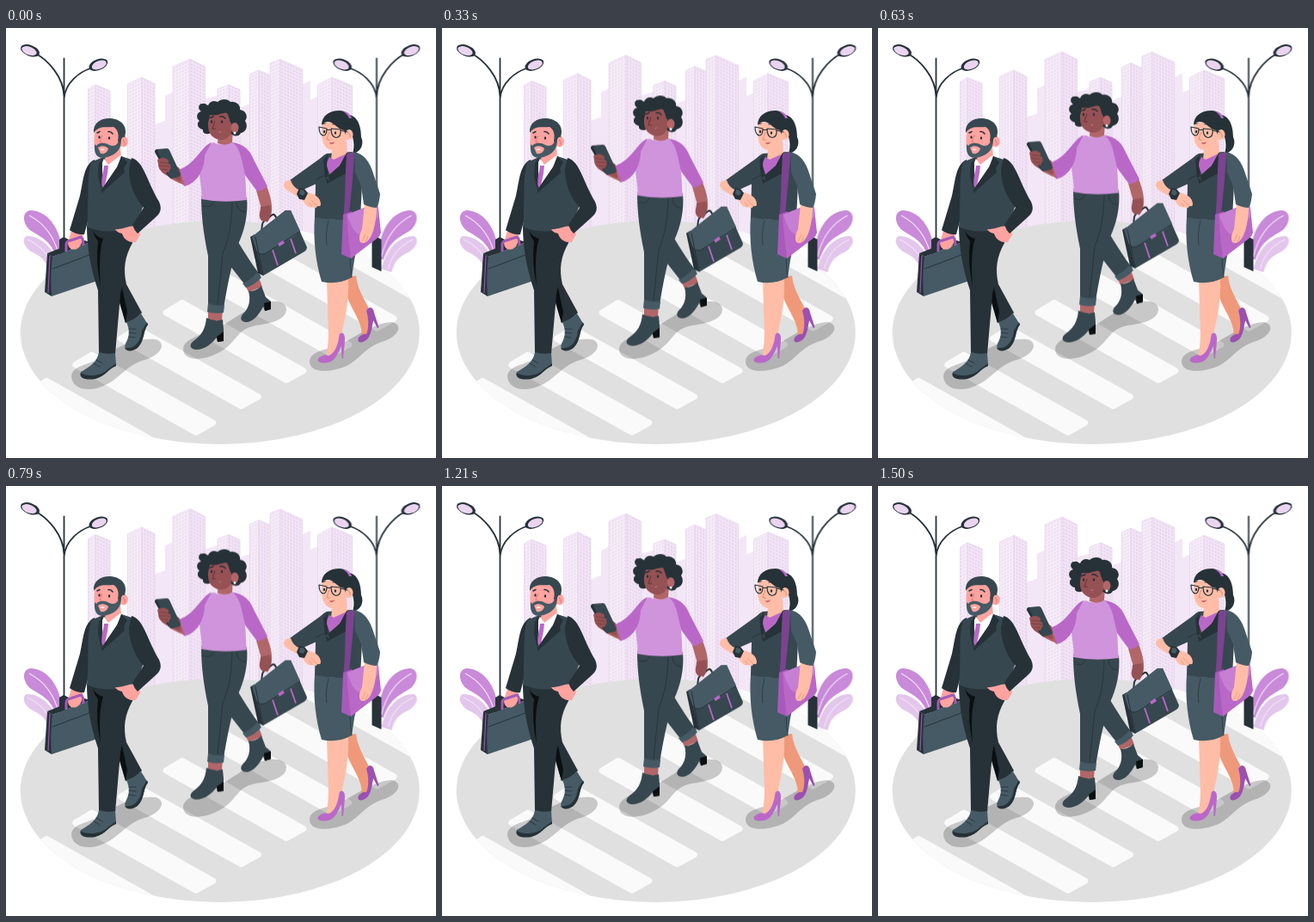
An HTML page for the animation above (1.54 s loop, 500 by 500 pixels).

```html
<!DOCTYPE html>
<html lang="en">
<head>
<meta charset="utf-8">
<title>Pedestrians</title>
<style>
html, body { margin: 0; width: 100%; height: 100%; overflow: hidden; background: #fff; }
svg { display: block; width: 100vw; height: 100vh; }
.float { animation: float 1540ms linear infinite; }
@keyframes float {
  0%, 97.4%, 100% { transform: translateY(0); }
  48.7% { transform: translateY(-10px); }
}
.ink { fill: #263238; }
.slate { fill: #37474f; }
.steel { fill: #455a64; }
.black { fill: #0b0f11; }
.violet { fill: #ba68c8; }
.lilac { fill: #cf94dc; }
.plum { fill: #9c50b0; }
.pink { fill: #ffa3a0; }
.peach { fill: #ffbda7; }
.tan { fill: #f0997a; }
.brown { fill: #955154; }
.rust { fill: #b16668; }
.line { fill: none; stroke: #263238; stroke-linecap: round; stroke-linejoin: round; }
.stripe { fill: #fafafa; stroke: #fafafa; stroke-width: 7; stroke-linejoin: round; }
.shade { fill: #000; opacity: .2; }
</style>
</head>
<body>
<svg viewBox="0 0 500 500" preserveAspectRatio="none">
<defs>
  <clipPath id="disc"><ellipse cx="248.8" cy="354" rx="232" ry="130"/></clipPath>
  <pattern id="winL" width="3.4" height="4" patternUnits="userSpaceOnUse" patternTransform="skewY(-25)">
    <rect x=".6" y=".8" width="2" height="2" fill="#ecdaf0"/>
  </pattern>
  <pattern id="winR" width="3.4" height="4" patternUnits="userSpaceOnUse" patternTransform="skewY(25)">
    <rect x=".6" y=".8" width="2" height="2" fill="#e6d0ec"/>
  </pattern>
  <g id="side">
    <path fill="#c98ad9" d="M65 266C66 238 51 213 29 212C18 213 19 227 28 235C39 243 52 245 60 270Z"/>
    <path fill="#e3c6ec" d="M62 280C57 256 40 241 24 242C17 246 22 256 31 261C41 266 47 270 50 284Z"/>
    <path fill="none" stroke="#f2e2f6" stroke-width="1.2" d="M27 218Q54 232 62 266M25 246Q48 256 54 280"/>
    <path class="ink" d="M62 246L67 243L73 246V278L62 283Z"/>
    <path class="line" stroke-width="1.800" d="M67.500 35.500V250M67.500 80C67 56 48 37 35 30M67.500 82C69 63 86 51 98 47"/>
    <g transform="translate(28 26.300) rotate(21)">
      <ellipse class="ink" rx="11.500" ry="6.300"/>
      <ellipse cx="-.8" cy=".6" rx="9" ry="4.700" fill="#ead4f0"/>
    </g>
    <g transform="translate(107.300 42.700) rotate(-21)">
      <ellipse class="ink" rx="11.500" ry="6.300"/>
      <ellipse cx=".8" cy=".6" rx="9" ry="4.700" fill="#ead4f0"/>
    </g>
  </g>
</defs>

<g id="city" class="float"></g>
<ellipse cx="248.8" cy="354" rx="232" ry="130" fill="#e0e0e0"/>
<g id="road" clip-path="url(#disc)"></g>
<use href="#side"/>
<use href="#side" transform="matrix(-1 0 0 1 498.500 0)"/>

<g>
  <path class="shade" d="M76 405C77 391 100 392 117 380C135 366 158 360 174 362C187 366 181 379 164 385C141 391 136 404 118 414C100 424 77 422 76 405Z"/>
  <path class="shade" d="M206 373C207 360 232 356 250 347C262 340 275 330 292 322C305 316 325 315 326 327C326 340 305 344 290 346C268 350 268 366 250 376C230 388 206 388 206 373Z"/>
  <path class="shade" d="M353 387C355 374 375 375 392 366C410 357 430 342 449 342C462 345 457 358 440 364C418 370 412 385 396 393C375 402 352 401 353 387Z"/>
</g>

<g id="man">
  <path class="ink" d="M48 262L54 266L53 312L45 307Z"/>
  <path class="ink" d="M48 262L88 246L98 249L54 266Z"/>
  <path class="steel" d="M54 266L98 249L106 294L53 312Q51 290 54 266Z"/>
  <path class="line" stroke-width="1" d="M54 280L102 262"/>
  <path fill="none" stroke="#9c50b0" stroke-width="1.200" d="M51 265L49 308"/>
  <path class="pink" d="M76 236L89 238C90 246 88 254 82 257C75 259 72 255 72 249Z"/>
  <path fill="none" stroke="#a45ab8" stroke-width="3" stroke-linejoin="round" d="M70 260V252Q70 248 75 247L87 243Q90 244 90 253"/>
  <path class="ink" d="M103 153C90 159 90 178 86 195L74 235Q82 241 91 240L98 214L106 180Z"/>
  <path class="ink" d="M110 240L151 234L147 250C138 266 136 280 140 298L158 331Q150 340 139 343L126 300Z"/>
  <path class="black" d="M133 293L141 330L139 343L130 310Z"/>
  <path class="ink" d="M94 230L137 234C140 262 138 288 133 310L127 379Q117 381 108 378L107 305C97 276 94 250 94 230Z"/>
  <path class="black" d="M101 236Q105 243 113 245Q107 262 110 300Q104 272 107 248Q103 243 101 236Z"/>
  <path class="steel" d="M108 377Q117 380 127 378L128 392C119 394 115 404 103 407C92 410 84 406 87 400C97 394 106 389 108 377Z"/>
  <path class="ink" d="M87 401C93 406 112 405 118 397L128 390V393C119 396 116 405 104 408C92 410 85 407 87 401Z"/>
  <path class="steel" d="M140 342Q150 339 157 332L165 345C159 352 161 364 152 372C143 378 136 374 139 367C144 358 144 351 140 342Z"/>
  <path class="ink" d="M164 342L165 345C159 352 162 363 153 372C146 377 140 376 138 372C150 374 157 364 158 352Z"/>
  <path class="line" stroke-width=".8" d="M102 390L109 394M105 386L112 390M143 354L151 355M143 350L151 350M143 359L150 360"/>
  <path class="slate" d="M113 150L99 156C93 175 97 202 94 231Q108 238 128 236L151 230L164 195L152 155L134 149Z"/>
  <path class="pink" d="M116 144L133 137L134 152L114 163Z"/>
  <path fill="#fff" d="M114 152L119 159L133 148L135 153L114 184L111 158Z"/>
  <path class="violet" d="M114 160L119 160L118 169L114 188L110 180L113 167Z"/>
  <path class="ink" d="M112 151L108 158L107 172L111 189L112 160ZM134 149L141 156L137 163L138 168L111 192L111 188L129 162Z"/>
  <path class="pink" d="M154 231C146 228 137 234 127 234Q129 238 135 239C137 246 143 250 151 249L156 240Z"/>
  <path class="ink" d="M146 151C160 155 163 176 178 202C182 211 179 216 173 221L153 239Q149 235 147 229L160 209C149 197 143 180 143 165Z"/>
  <ellipse class="pink" cx="137" cy="132" rx="4.800" ry="6.500"/>
  <path class="pink" d="M104 117C101 132 102 146 110 150C122 152 134 144 135 132L132 113L112 110Z"/>
  <path class="slate" d="M102 122C101 111 109 105 121 105C135 106 142 115 138 127Q135 126 134 130L133 138L130 131C132 123 129 117 125 115C116 116 108 113 102 122Z"/>
  <path class="steel" d="M103 135C102 148 107 151 113 151C122 150 131 145 133 137L131 130C130 137 125 138 120 136C115 133 108 133 105 137Z"/>
  <path class="pink" d="M107 139C111 136 116 137 119 140C118 145 114 147 110 146Z"/>
  <path fill="#fff" d="M109 141Q113 140 115 141Q113 143 109 141Z"/>
  <path fill="none" stroke="#e87f7d" stroke-width="1.200" d="M112 125L109 132Q111 134 113 133M136 130Q139 132 138 136"/>
  <path class="line" stroke-width="1.600" d="M106 122L109 120.500M119 120.500Q122 120 124 123"/>
  <ellipse class="ink" cx="108.500" cy="127" rx="1.200" ry="1.700"/>
  <ellipse class="ink" cx="120" cy="128" rx="1.200" ry="1.700"/>
</g>

<g id="walker" class="float">
  <path class="rust" d="M277 297L294 290L298 301L282 307Z"/>
  <path class="slate" d="M258 235L270 249C278 262 286 275 296 288Q289 296 279 300L257 272Z"/>
  <path class="steel" d="M292 284L297 290Q289 299 279 302L275 297Q285 293 292 284Z"/>
  <path class="slate" d="M282 306Q291 306 297 300L302 313L308 318V327L301 329L299 324C294 334 287 342 279 342C271 341 272 335 278 330C284 322 284 314 282 306Z"/>
  <path class="black" d="M300 320L308 318V327L301 329Z"/>
  <path class="rust" d="M235 326H252L251 340H235Z"/>
  <path class="slate" d="M227 196Q252 203 280 197C282 216 277 237 270 251C262 275 257 302 253 326Q243 328 235 325L235 265C229 236 227 216 227 196Z"/>
  <path class="steel" d="M235 320Q243 324 254 322L253 331Q243 333 234 330Z"/>
  <path class="line" stroke-width=".8" d="M263 203C262 228 260 243 252 262L246 321M268 202Q268 213 278 214M229 207Q238 210 241 203"/>
  <path class="slate" d="M233 337Q243 342 252 339L253 350V364L246 365L245 360C239 367 231 374 221 374C213 373 213 368 218 364C228 357 232 349 233 337Z"/>
  <path class="black" d="M245 359L253 353V364L246 365Z"/>

  <path class="rust" d="M291 189L303 184C308 196 311 209 308 219L304 226L296 222Q293 217 297 210Z"/>
  <path class="line" stroke-width="2" d="M297 237L298 228Q299 225 302 223L310 217Q313 216 315 223"/>
  <path class="brown" d="M296 208L307 206C309 214 308 222 303 225Q295 226 295 218Z"/>
  <path class="ink" d="M284 243L289 240L299 288L293 285Z"/>
  <path class="slate" d="M287 242L325 212L331 212L350 255Q350 258 347 260L299 288Z"/>
  <path class="steel" d="M286 243L325 212L331 212L342 236L336 242L301 263Q294 264 291 258Z"/>
  <path class="line" stroke-width="1" d="M291 260Q296 265 302 262L341 237M290 243L299 287"/>
  <path fill="none" stroke="#ba68c8" stroke-width="1.800" d="M310 258L316 276M331 245L337 262"/>
  <path class="violet" d="M316 251L322 247L324 250L318 254Z"/>

  <path class="violet" d="M262 133C277 134 284 143 288 153L304 184Q299 189 292 190L278 171L267 150Z"/>
  <path class="lilac" d="M241 133C231 137 226 145 225 160C224 178 229 186 227 199Q252 204 280 200C278 188 280 176 276 162C273 148 271 138 263 133Q251 138 241 133Z"/>
  <path class="violet" d="M239 133C229 136 220 157 205 163L199 166L207 184C223 181 231 163 231 148Z"/>
  <path class="rust" d="M188 164L201 162L208 183Q200 180 191 175Z"/>
  <path class="brown" d="M180 152L190 153L202 164L204 179L192 174Q178 168 177 160Z"/>
  <path class="slate" d="M175 141L187 140Q189 140 190 142L203 170Q203 172 201 173L193 175Q191 175 190 173L173 144Q173 142 175 141Z"/>
  <path class="ink" d="M175 141L190 173L193 175Q191 175 189 173L173 144Q173 142 175 141Z"/>
  <path class="brown" d="M176 153Q183 149 188 153Q191 156 187 157Q193 158 191 161Q193 163 190 165Q191 168 186 168Q177 165 176 153Z"/>
  <path fill="none" stroke="#743b3e" stroke-width=".7" d="M179 156L187 157M179 160L190 161M181 164L189 165"/>

  <path class="rust" d="M247 121L264 116L263 133Q255 138 246 134Z"/>
  <path class="ink" d="M238 122C233 125 228 122 229 118C223 117 221 111 225 108C220 104 222 98 227 97C222 94 224 87 229 88C232 87 233 90 235 90C237 85 242 84 246 86C250 82 258 82 261 86C268 85 273 90 272 95C279 96 282 103 278 108C282 114 279 121 273 122C271 127 264 126 262 123Z"/>
  <path class="brown" d="M237 101C247 103 251 98 257 99C260 104 260 109 262 111C265 123 258 131 248 130C239 128 234 121 235 110Z"/>
  <ellipse class="rust" cx="266" cy="116" rx="4.500" ry="6"/>
  <circle cx="266" cy="122" r="1.500" fill="#fff"/>
  <path fill="none" stroke="#6f373a" stroke-width="1.200" d="M243 108L240 117Q242 118 244 117"/>
  <path fill="#f6d5d4" d="M246 120.500Q248 122 250 120Q249 122.500 246 120.500Z"/>
  <path class="line" stroke-width="1.500" d="M237 104.500L241 103M249 103Q252 102 255 105"/>
  <ellipse class="ink" cx="239" cy="109" rx="1.200" ry="1.700"/>
  <ellipse class="ink" cx="251" cy="109" rx="1.200" ry="1.700"/>
</g>

<g id="woman">
  <path class="tan" d="M395 290L407 288C409 308 421 320 427 338C426 350 421 358 413 360C417 344 400 326 396 310Z"/>
  <path class="plum" d="M419 329C422 323 427 324 428 331L433.500 348L432 349L427 340C425 351 424 362 415 365C408 367 408 361 412 358Q416 355 419 356C422 350 422 338 419 329Z"/>
  <path class="peach" d="M373 293L398 291C399 316 395 335 391 352C390 367 386 379 377 385L372 382C377 362 374 340 374 325Z"/>
  <path class="violet" d="M387.500 357C390 352 395 355 394 364L392 384H390.500L390 370C386 377 384 387 374 389C363 391 359 386 366 382Q371 379 375 381C382 379 386 369 387.500 357Z"/>
  <path class="steel" d="M359 219Q385 226 411 219C410 242 408 256 405 270L402 290Q386 299 367 295C360 272 357 245 359 219Z"/>
  <path class="line" stroke-width=".7" d="M375 224Q371 240 373 252M402 290Q399 270 401 257"/>

  <path class="ink" d="M396 101C408 100 413 113 413 127C417 135 412 145 403 146C406 137 404 127 400 118Z"/>
  <path class="slate" d="M373 146C363 150 358 166 360 182L359 220Q386 226 412 221L414 182L418 156L402 144Z"/>
  <path class="peach" d="M380 136L396 131L397 147L377 160Z"/>
  <path class="violet" d="M376 150L381 153L394 147L396 152L377 172L372 158Z"/>
  <path class="ink" d="M374 147L369 154L371 173L376 178L373 160ZM396 145L403 149L398 162L399 167L373 181L372 174L388 160Z"/>
  <path class="slate" d="M369 149L330 177Q333 187 341 190L370 177Z"/>
  <path class="line" stroke-width=".8" d="M361 176L371 171"/>
  <path class="peach" d="M331 177C322 177 321 184 326 188L344 199L349 190L341 188Q334 186 331 177Z"/>
  <path class="peach" d="M349 191C358 192 366 197 366 205Q366 208 362 207Q361 211 356 208Q352 210 348 205L344 199Z"/>
  <path fill="none" stroke="#e9947c" stroke-width=".8" d="M355 200L362 207M352 203L356 208"/>
  <path class="ink" d="M341 186L347 187L351 192L347 200L341 199L338 193Z"/>
  <path class="steel" d="M342 188L346 188.500L348 192L345 195L341 193Z"/>

  <path fill="#7b4390" d="M396 147Q400 143 405 146C404 172 401 192 399 218L392 222C395 198 394 172 396 147Z"/>
  <path fill="#a85abb" d="M392 217L402 213L401 268L390 263Z"/>
  <path class="violet" d="M396 217L429 204Q432 205 433 210L436 238Q435 242 431 245L401 268Q398 245 396 217Z"/>
  <path fill="#c67fd2" d="M397 217L429 204Q432 205 433 210L434 217L419 239Q405 246 397 217Z"/>
  <path class="peach" d="M417 204L431 206C431 222 428 238 422 246Q417 252 412 249Q409 243 414 234Z"/>
  <path fill="none" stroke="#e9947c" stroke-width=".8" d="M414 248L418 240M418 249L421 242"/>
  <path class="steel" d="M405 144C417 147 423 156 427 169L435 193Q434 204 431 209Q424 209 416 205L413 184L406 168Z"/>

  <path class="peach" d="M368 110C366 126 367 139 378 142C389 143 397 134 396 123L393 109Z"/>
  <path class="ink" d="M367 113C367 102 376 96 388 96C400 97 406 107 401 120L397 130L393 119C386 118 381 109 375 109Q370 109 367 113Z"/>
  <path class="violet" d="M392 97Q399 97 402 105L399 105Q397 100 392 97Z"/>
  <ellipse class="peach" cx="399" cy="124" rx="4.500" ry="6"/>
  <path fill="none" stroke="#e9947c" stroke-width="1.100" d="M376 121L373 129Q375 131 377 130M398 122Q401 124 400 127"/>
  <path fill="#d9616a" d="M376 133Q379 134 382 132Q381 136 377 135Z"/>
  <path class="line" stroke-width="1.200" d="M364 115L373 117Q373 125 369 125Q364 124 364 115ZM378 117L389 118Q390 127 384 127.500Q378 127 378 117ZM373 118.500L378 118.500M389 119L397 121M368 111.500L371 111M380 112Q384 111 387 114"/>
  <ellipse class="ink" cx="370" cy="120.500" rx="1.200" ry="1.700"/>
  <ellipse class="ink" cx="383" cy="122" rx="1.200" ry="1.700"/>
</g>
</svg>

<script>
const $ = id => document.getElementById(id);
const floor = 272;

// A tower seen from its corner: left edge, ridge, right edge.
function tower(xl, yl, xm, ym, xr, yr) {
  const left = `M${xl} ${floor}V${yl}L${xm} ${ym}V${floor}Z`;
  const right = `M${xm} ${floor}V${ym}L${xr} ${yr}V${floor}Z`;
  const face = (d, fill, pat) =>
    `<path d="${d}" fill="${fill}" stroke="#e8d6ed" stroke-width=".8"/><path d="${d}" fill="url(#${pat})"/>`;
  return face(left, '#f6edf8', 'winL') + face(right, '#f3e6f6', 'winR');
}

const block = (x, y, w) =>
  `<path d="M${x} ${floor}V${y}l${w} -5V${floor}Z" fill="#f3e6f6"/>`;

$('city').innerHTML =
  block(173, 112, 14) + block(185, 79, 10) + block(231, 83, 17) + block(271, 93, 13) +
  block(344, 66, 10) + block(353, 84, 11) +
  [
    [95.5, 71, 104, 66, 121, 73],
    [141.5, 65, 158, 57.5, 173, 65],
    [246, 71, 259, 66, 272, 72],
    [194, 45, 214, 36, 231.5, 45],
    [283.5, 54, 294, 49, 308, 55],
    [307, 41, 319, 36.5, 344.5, 48],
    [362.5, 66, 379, 57.5, 402.5, 67]
  ].map(t => tower(...t)).join('');

let road = '';
for (let k = -3; k <= 3; k++)
  road += `<path class="stripe" transform="translate(${k * 52.6} ${k * -30.3})" d="M186 331L205 319.500L346 398.500L326 409.500Z"/>`;
$('road').innerHTML = road;
</script>
</body>
</html>
```
